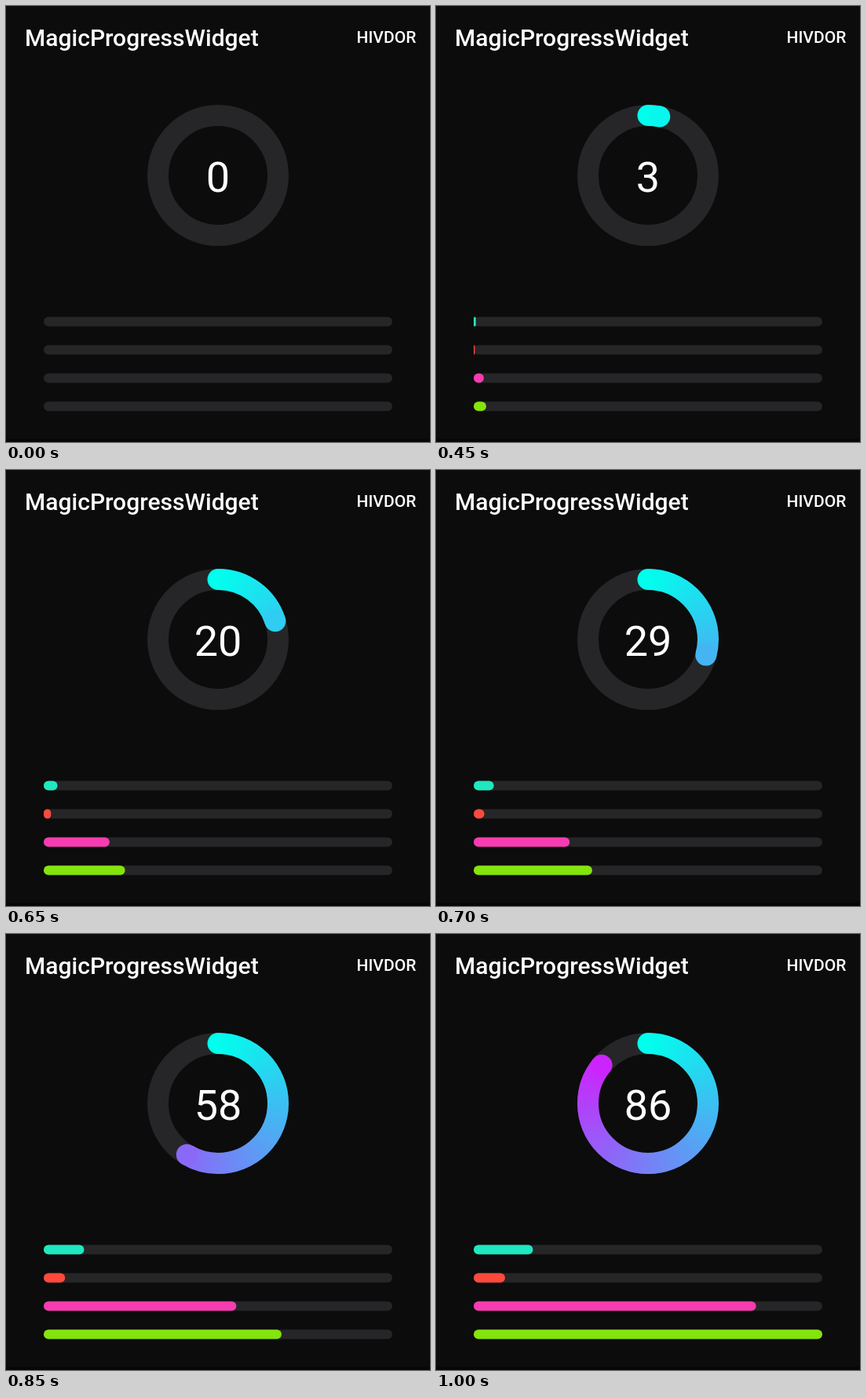
An HTML page with a canvas that plays this animation: 540x556 px, repeating every 4 s.

```html
<!DOCTYPE html>
<html lang="en">
<head>
<meta charset="utf-8">
<title>MagicProgressWidget</title>
<style>
  html, body { margin: 0; width: 100%; height: 100%; overflow: hidden; background: #0c0c0c; }
  canvas { display: block; }
</style>
</head>
<body>
<canvas id="stage" width="540" height="556"></canvas>
<script>
const ctx = document.getElementById('stage').getContext('2d');

const LOOP = 4000, START = 350, STEP = 50;
const SCORE = 86;
const TRACK = '#262628';
const RING = { x: 270, y: 216, r: 76.5, width: 27 };
const BAR = { x: 48, width: 444, height: 12 };
const BARS = [
  { y: 396.5, share: 0.17, color: '#20e8c0' },
  { y: 432.5, share: 0.09, color: '#ff493d' },
  { y: 468.5, share: 0.81, color: '#f63cb1' },
  { y: 504.5, share: 1, color: '#84e40c' }
];

// Time in ms and animation phase; the phase is squared for acceleration.
const PHASES = [
  [350, 0.01], [550, 0.3695], [650, 0.483], [750, 0.683],
  [850, 0.826], [900, 0.91], [950, 0.985], [1000, 1]
];

function progress(time) {
  if (time < START) return 0;
  const i = PHASES.findIndex(p => p[0] > time);
  if (i < 0) return 1;
  const [t0, a] = PHASES[i - 1], [t1, b] = PHASES[i];
  const phase = a + (b - a) * (time - t0) / (t1 - t0);
  return phase * phase;
}

function ringColor(f) {
  const mix = (a, b) => Math.round(a + (b - a) * f);
  return `rgb(${mix(0, 237)}, ${mix(255, 0)}, ${mix(237, 255)})`;
}

function text(str, x, y, font, align = 'left') {
  ctx.font = `${font} Roboto, sans-serif`;
  ctx.textAlign = align;
  ctx.fillStyle = '#fff';
  ctx.fillText(str, x, y);
}

function arc(from, to, style) {
  ctx.beginPath();
  ctx.arc(RING.x, RING.y, RING.r, from, to);
  ctx.lineWidth = RING.width;
  ctx.strokeStyle = style;
  ctx.stroke();
}

function cap(angle, color) {
  ctx.beginPath();
  ctx.arc(RING.x + RING.r * Math.cos(angle), RING.y + RING.r * Math.sin(angle),
    RING.width / 2, 0, Math.PI * 2);
  ctx.fillStyle = color;
  ctx.fill();
}

function drawRing(p) {
  arc(0, Math.PI * 2, TRACK);
  if (p <= 0) return;
  const part = p * SCORE / 100;
  const top = -Math.PI / 2, end = top + part * Math.PI * 2;
  const sweep = ctx.createConicGradient(top, RING.x, RING.y);
  sweep.addColorStop(0, ringColor(0));
  sweep.addColorStop(part, ringColor(part));
  sweep.addColorStop(1, ringColor(part));
  cap(top, ringColor(0));
  arc(top, end, sweep);
  cap(end, ringColor(part));
}

function pill(y, width, color) {
  ctx.beginPath();
  ctx.roundRect(BAR.x, y, width, BAR.height, Math.min(BAR.height, width) / 2);
  ctx.fillStyle = color;
  ctx.fill();
}

function draw(time) {
  const p = progress(time);
  ctx.fillStyle = '#0c0c0c';
  ctx.fillRect(0, 0, 540, 556);
  ctx.fillStyle = '#070707';
  ctx.fillRect(0, 552, 540, 4);

  text('MagicProgressWidget', 24, 51, '500 30px');
  text('HIVDOR', 446.5, 47, '500 21px');

  drawRing(p);
  text(String(Math.floor(p * SCORE)), RING.x, 237, '400 54px', 'center');

  for (const bar of BARS) {
    pill(bar.y, BAR.width, TRACK);
    const width = BAR.width * bar.share * p;
    if (width > 0.5) pill(bar.y, width, bar.color);
  }
}

const origin = performance.now();
function tick() {
  const time = (performance.now() - origin) % LOOP;
  draw(Math.floor(time / STEP) * STEP);
  requestAnimationFrame(tick);
}
tick();
</script>
</body>
</html>
```
